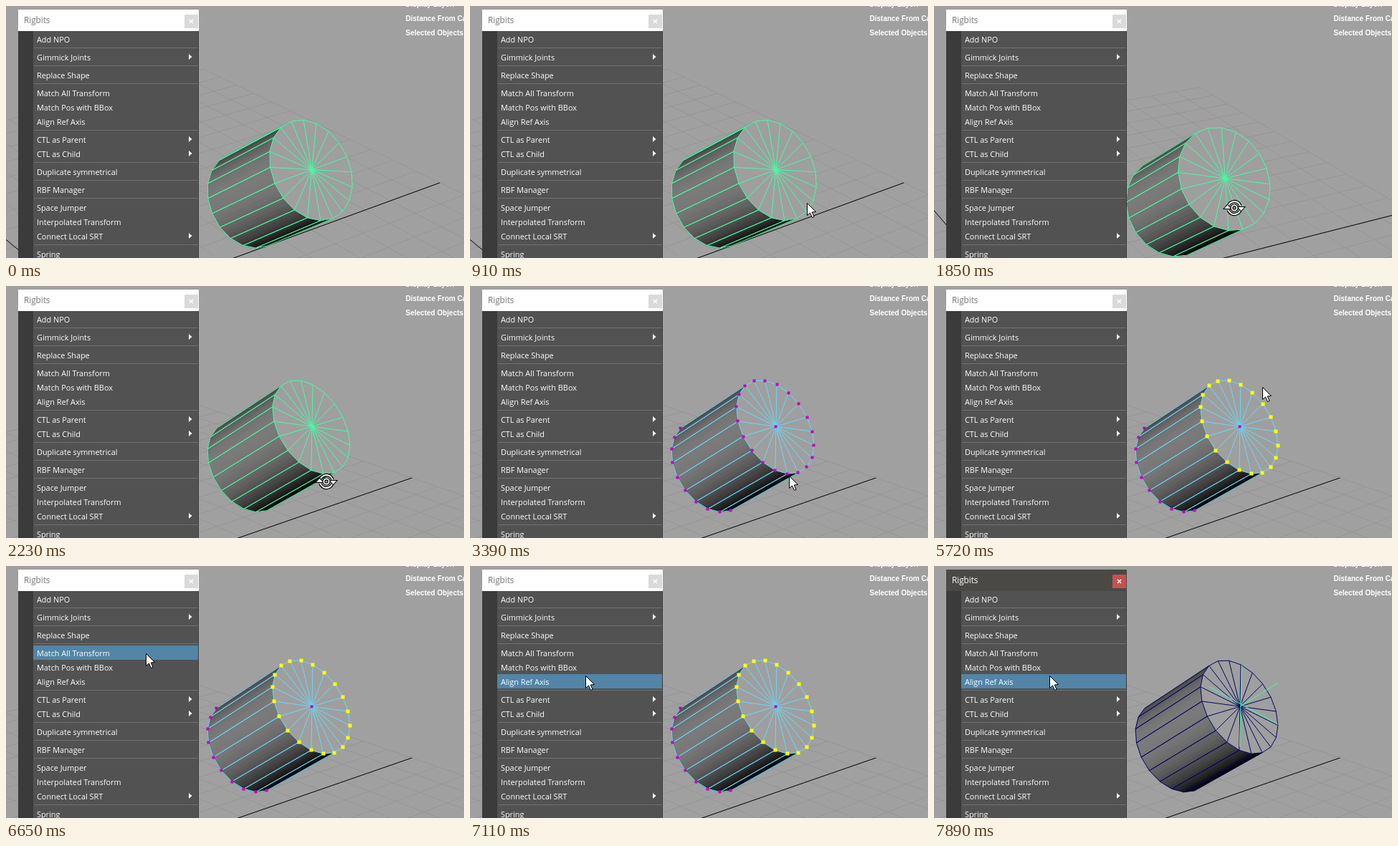
An HTML page with a canvas for the animation above (8 s loop, 639 by 352 pixels).

```html
<!DOCTYPE html>
<html lang="en">
<head>
<meta charset="utf-8">
<title>Rigbits menu</title>
<style>
  html, body { margin: 0; width: 100%; height: 100%; overflow: hidden; background: #a0a0a0; }
  canvas { display: block; }
</style>
</head>
<body>
<canvas id="stage" width="639" height="352"></canvas>
<script>
const ctx = document.getElementById('stage').getContext('2d');
const LOOP = 8000;
const GREEN = '#43ffa3', NAVY = '#000464', CYAN = '#64dcff', MAGENTA = '#c000c0';

// World units: half the floor grid is 1, the camera tumbles around the origin.
const FOCAL = 1723, EYE = { x: -0.271, y: -0.3555, depth: 2.51 };
const VIEWS = [[36.6, 23.5, 5], [28, 21.8, 5], [41, 17.4, 0]];  // yaw, pitch, pan
const CAP = [0.244, 0.392, -0.386], AXIS = [0.12, 0.595, -0.797], RADIAL = [0.272, 0.75, 0.603];
const SIDES = 20, RADIUS = 0.0942, LENGTH = 0.193;

const TUMBLE_START = 1220, TUMBLE_TURN = 1850, TUMBLE_END = 2460;
const VERTEX_MODE = 3330, RIM_SELECTED = 5100, CIRCLING = 5330, TO_MENU = 6180;
const WINDOW_ACTIVE = 7740, ALIGNED = 7890;

// Pointer moves: start, end, x, y.
const ENTRY = [528, 352];
const MOVES = [
  [70, 530, 470, 286], [680, 910, 470, 275],
  [TUMBLE_START, TUMBLE_TURN, 419, 282], [TUMBLE_TURN, 2000, 433, 277], [2080, 2230, 447, 273],
  [2850, 2930, 445, 265], [3770, 4100, 438, 258], [4250, 4480, 453, 256],
  [6100, TO_MENU, 366, 181], [TO_MENU, 6650, 195, 122], [6650, 6960, 160, 152], [7100, 7110, 161, 153],
];

const MENU = [
  ['Add NPO'], ['Gimmick Joints >'], ['Replace Shape'],
  ['Match All Transform', 'Match Pos with BBox', 'Align Ref Axis'],
  ['CTL as Parent >', 'CTL as Child >'], ['Duplicate symmetrical'], ['RBF Manager'],
  ['Space Jumper', 'Interpolated Transform', 'Connect Local SRT >'], ['Spring'],
];

const clamp = n => Math.min(1, Math.max(0, n));
const mix = (a, b, f) => a.map((n, i) => n + (b[i] - n) * f);
const cross = (a, b) => [0, 1, 2].map(i => {
  const j = (i + 1) % 3, k = (i + 2) % 3;
  return a[j] * b[k] - a[k] * b[j];
});
const TANGENT = cross(RADIAL, AXIS);

function pointerAt(t) {
  if (t >= CIRCLING && t < 6100) {
    const angle = -1.1 + 4.05 * (t - CIRCLING) / (6100 - CIRCLING);
    return [425 + 58 * Math.cos(angle), 193 - 64 * Math.sin(angle)];
  }
  return MOVES.reduce((at, [start, end, x, y]) =>
    mix(at, [x, y], clamp((t - start) / (end - start))), ENTRY);
}

// Dragging turns the view: out to the second pose, then back to the third.
function viewAt(t) {
  if (t < TUMBLE_START) return VIEWS[0];
  const [x] = pointerAt(Math.min(t, TUMBLE_END));
  return t < TUMBLE_TURN ? mix(VIEWS[0], VIEWS[1], (470 - x) / 51)
                         : mix(VIEWS[1], VIEWS[2], (x - 419) / 28);
}

function projector([yaw, pitch, pan]) {
  const rad = Math.PI / 180;
  const cy = Math.cos(yaw * rad), sy = Math.sin(yaw * rad);
  const cp = Math.cos(pitch * rad), sp = Math.sin(pitch * rad);
  return ([x, y, z]) => {
    const right = x * cy - z * sy, away = x * sy + z * cy;
    const scale = FOCAL / (EYE.depth + away * cp - y * sp);
    return [300 + pan + scale * (EYE.x + right), 180 - scale * (EYE.y + y * cp + away * sp)];
  };
}

function trace(points, closed) {
  ctx.beginPath();
  points.forEach(([x, y]) => ctx.lineTo(x, y));
  if (closed) ctx.closePath();
}

function line(points, color, width = 1, closed = false) {
  trace(points, closed);
  ctx.strokeStyle = color;
  ctx.lineWidth = width;
  ctx.stroke();
}

function fill(points, color) {
  trace(points, true);
  ctx.fillStyle = color;
  ctx.fill();
}

function rect(x, y, w, h, color) {
  ctx.fillStyle = color;
  ctx.fillRect(x, y, w, h);
}

function text(label, x, y, font, color) {
  ctx.font = font;
  ctx.fillStyle = color;
  ctx.fillText(label, x, y);
}

function drawFloor(project) {
  const CELLS = 12, NEAR = -0.75;
  const gridLines = (n, color) => {
    line([project([n, 0, NEAR]), project([n, 0, 1])], color);
    line([project([NEAR, 0, n]), project([1, 0, n])], color);
  };
  for (let i = NEAR * CELLS; i <= CELLS; i++) gridLines(i / CELLS, '#959595');
  gridLines(0, '#000');
}

function vertexColor(k, t) {
  if (t >= RIM_SELECTED) return '#ff0';
  if (k === 10 && t >= 3850) return t < 4180 ? '#f00' : '#ff0';
  if (k === 11 && t >= 4400) return t < 4950 ? '#f00' : '#ff0';
  return MAGENTA;
}

function drawVertex([x, y], color) {
  const size = color === MAGENTA ? 4 : 5;
  rect(Math.round(x - size / 2), Math.round(y - size / 2), size, size, color);
}

function shadeSide(a, b, backA, backB, k) {
  const STEP = 0.25;
  for (let f = 0; f < 1; f += STEP) {
    const g = f + STEP;
    const light = Math.max(0, Math.cos((k + f + STEP / 2 - 5.3) * 16 * Math.PI / 180));
    const shade = Math.round(122 * light ** 1.3);
    const color = `rgb(${shade},${shade},${shade})`;
    const strip = [mix(a, b, f), mix(a, b, g), mix(backA, backB, g), mix(backA, backB, f)];
    fill(strip, color);
    line(strip, color, 0.7, true);
  }
}

function drawCylinder(project, t) {
  const ring = offset => Array.from({ length: SIDES }, (_, k) => {
    const angle = k * 2 * Math.PI / SIDES;
    return project(CAP.map((n, i) => n - AXIS[i] * offset +
      RADIUS * (RADIAL[i] * Math.cos(angle) + TANGENT[i] * Math.sin(angle))));
  });
  const front = ring(0), back = ring(LENGTH), centre = project(CAP);
  const facing = k => {
    const j = (k + 1) % SIDES, a = front[k], b = front[j], c = back[k];
    return (b[0] - a[0]) * (c[1] - a[1]) > (b[1] - a[1]) * (c[0] - a[0]);
  };
  const sides = front.map((_, k) => k).filter(facing);
  const vertexMode = t >= VERTEX_MODE && t < ALIGNED;
  const wire = vertexMode ? CYAN : t < VERTEX_MODE ? GREEN : NAVY;

  for (const k of sides) {
    const j = (k + 1) % SIDES;
    shadeSide(front[k], front[j], back[k], back[j], k);
  }
  fill(front, '#9f9f9f');
  for (const k of sides) {
    const j = (k + 1) % SIDES;
    line([front[k], back[k], back[j], front[j]], wire);
  }
  line(front, wire, 1, true);
  front.forEach(p => line([centre, p], wire));

  if (vertexMode) {
    const outline = new Set(sides.flatMap(k => [k, (k + 1) % SIDES]));
    outline.forEach(k => drawVertex(back[k], MAGENTA));
    front.forEach((p, k) => drawVertex(p, vertexColor(k, t)));
    drawVertex(centre, MAGENTA);
  } else if (t >= ALIGNED) {
    line([[429, 138], [426, 252]], GREEN);
    line([[383, 168], [480, 221]], GREEN);
    line([centre, [479, 163]], GREEN);
  }
}

function drawHud() {
  ['Display Layer:', 'Distance From Camera:', 'Selected Objects:'].forEach((label, i) =>
    text(label, 557.5, 1 + i * 20, 'bold 10px "Liberation Sans", sans-serif', '#fff'));
}

function drawTitle(active) {
  rect(17, 5, 252, 30, active ? '#4a4946' : '#fff');
  text('Rigbits', 25, 24, '11.7px "Open Sans", sans-serif', active ? '#fff' : '#777');
  rect(249, 12, 19, 19, active ? '#c75050' : '#dadada');
  line([[256, 19], [261, 24]], '#fff', 1.4);
  line([[261, 19], [256, 24]], '#fff', 1.4);
}

function drawMenu(hoverY) {
  const ROW = 20, GAP = 5;
  rect(17, 35, 252, 317, '#3b3b3b');
  rect(38, 35, 230, 317, '#525252');
  let top = 36;
  for (const group of MENU) {
    for (const item of group) {
      if (hoverY >= top && hoverY < top + ROW) rect(38, top, 230, ROW, '#5285a6');
      text(item.replace(' >', ''), 43, top + 15, '10.85px "Open Sans", sans-serif', '#fff');
      if (item.endsWith('>')) fill([[255, top + 6], [259.5, top + 10], [255, top + 14]], '#fff');
      top += ROW;
    }
    rect(39, top + 2, 229, 1, '#707070');
    top += GAP;
  }
}

function drawArrow(x, y) {
  const shape = [[0, 0], [0, 17], [4, 13.5], [7, 20], [9.5, 19], [6.7, 12.5], [12, 12]];
  const points = shape.map(([px, py]) => [x + px + 0.5, y + py + 0.5]);
  fill(points, '#fff');
  line(points, '#000', 1, true);
}

function drawTumble(x, y) {
  const arc = (radius, from, to, width, color) => {
    ctx.beginPath();
    ctx.arc(x, y, radius, from * Math.PI, to * Math.PI);
    ctx.strokeStyle = color;
    ctx.lineWidth = width;
    ctx.stroke();
  };
  for (const [color, width] of [['#000', 4.2], ['#fff', 2]]) {
    for (const side of [1, -1]) {
      const turn = side > 0 ? 1 : 0;
      arc(9, turn + 0.15, turn + 0.9, width, color);
      const head = [[5, -1], [14, -1], [9.5, 4]].map(([px, py]) => [x + side * px, y + side * py]);
      if (color === '#000') line(head, color, 2, true);
      fill(head, color);
    }
  }
  arc(3.6, 0, 2, 4, '#000');
  arc(3.6, 0, 2, 1.8, '#fff');
}

function draw(t) {
  rect(0, 0, 639, 352, '#a0a0a0');
  const project = projector(viewAt(t));
  ctx.save();
  ctx.translate(0.5, 0.5);
  drawFloor(project);
  drawCylinder(project, t);
  ctx.restore();
  drawHud();

  const [x, y] = pointerAt(t).map(Math.round);
  drawMenu(x < 268 ? y : -1);
  drawTitle(t >= WINDOW_ACTIVE);
  if (t >= TUMBLE_START && t < TUMBLE_END) drawTumble(x, y);
  else if (t >= 70) drawArrow(x, y);
}

function tick(now) {
  draw(now % LOOP);
  requestAnimationFrame(tick);
}
requestAnimationFrame(tick);
</script>
</body>
</html>
```
